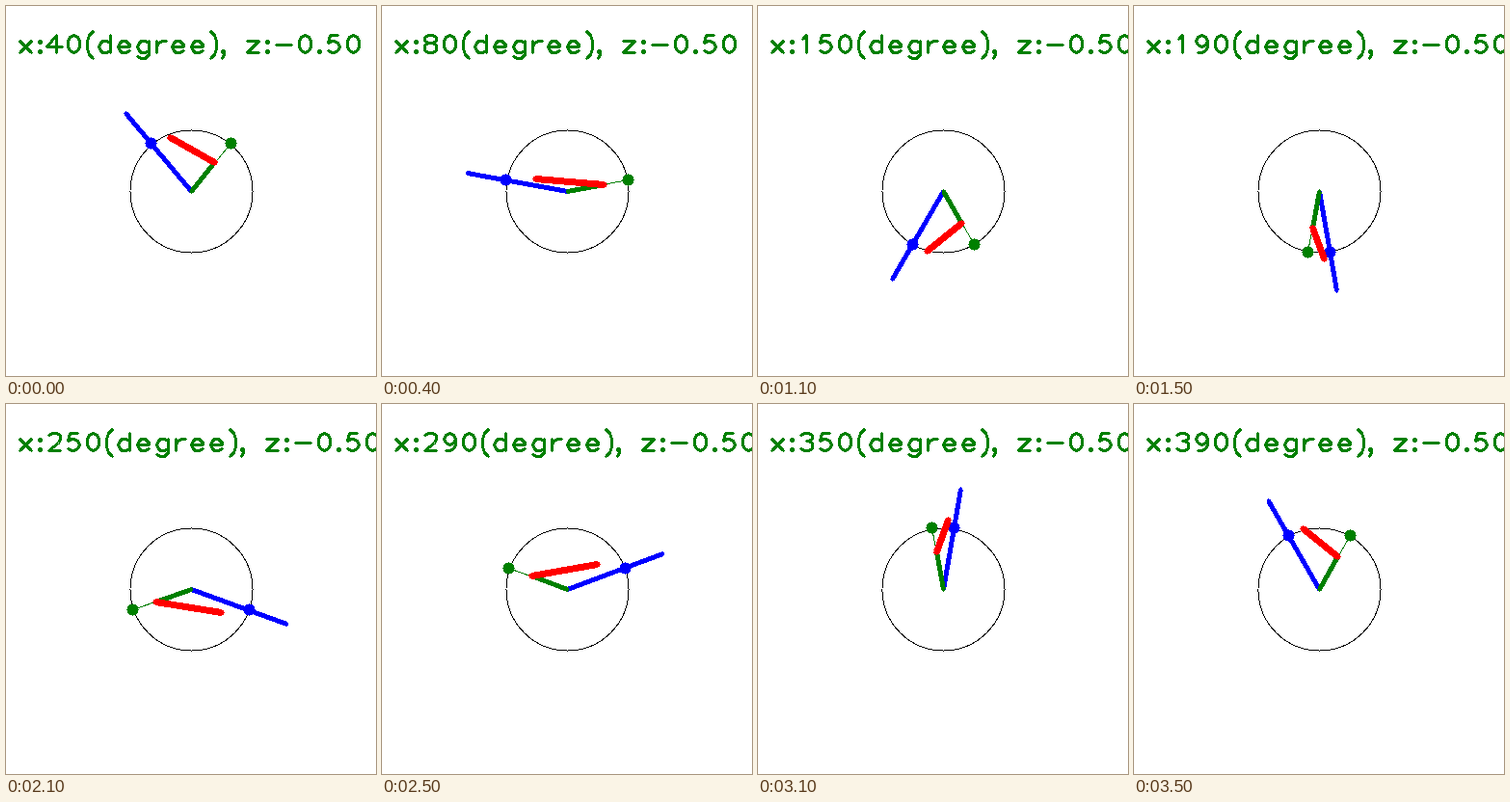
Animation, 384 px wide and 384 px high, one loop 3.6 s. Source, as an HTML page:

```html
<!DOCTYPE html>
<html lang="en">
<meta charset="utf-8">
<title>Complex cosine</title>
<style>
  html, body { margin: 0; width: 100%; height: 100%; overflow: hidden; background: #fff; }
  svg { display: block; fill: none; shape-rendering: crispEdges; }
  /* Each thick line is a flat-ended body over slightly slimmer round caps. */
  .caps { stroke-linecap: round; stroke-linejoin: round; }
  .body { stroke-linecap: butt; stroke-linejoin: bevel; }
</style>
<svg width="384" height="384" viewBox="0 0 384 384" role="img">
  <defs>
    <path id="blueArm"/>
    <path id="greenArm"/>
    <path id="redArm"/>
    <g id="label"></g>
  </defs>
  <g transform="translate(.5 .5)">
    <circle cx="192" cy="192" r="63.52" stroke="#000"/>
    <path id="spoke" stroke="#008000"/>
    <g stroke="#00f">
      <use href="#blueArm" class="caps" stroke-width="4.1"/>
      <use href="#blueArm" class="body" stroke-width="5"/>
    </g>
    <circle id="blueDot" r="6.05" fill="#00f"/>
    <g stroke="#008000">
      <use href="#greenArm" class="caps" stroke-width="4.1"/>
      <use href="#greenArm" class="body" stroke-width="5"/>
    </g>
    <circle id="greenDot" r="6.05" fill="#008000"/>
    <g stroke="#f00">
      <use href="#redArm" class="caps" stroke-width="6.1"/>
      <use href="#redArm" class="body" stroke-width="7"/>
    </g>
    <g stroke="#008000" transform="translate(10 40) scale(2)">
      <use href="#label" class="caps" stroke-width="1.1"/>
      <use href="#label" class="body" stroke-width="1.5"/>
    </g>
  </g>
</svg>
<script>
// Stroke font: advance width, then the pen path around the middle line.
const glyphs = {
  '0': [10, 'M5-5L3-4 2-2V1L3 3 5 4 7 3 8 1V-2L7-4z'],
  '1': [10, 'M3-3L5-5V4'],
  '2': [10, 'M2-4L4-5H6L8-4V-2L7 0 2 4H8'],
  '3': [10, 'M2-4L4-5H6L8-4V-2L6-1M5-1H6L8 0V3L6 4H4L2 3'],
  '4': [10, 'M6-5V4M6-5L1 1H9'],
  '5': [10, 'M7-5H3L2-1 4-2H5L7-1 8 1 7 3 5 4H4L2 3'],
  '6': [10, 'M7-4L5-5 3-4 2-2V1L3 3 5 4 7 3 8 1 7-1 5-2 3-1 2 1'],
  '7': [10, 'M2-5H8L4 4'],
  '8': [10, 'M4-5L2-4V-2L4-1H6L8-2V-4L6-5zM4-1L2 0V3L4 4H6L8 3V0L6-1'],
  '9': [10, 'M8-2L7 0 5 1 3 0 2-2 3-4 5-5 7-4 8-2V1L7 3 5 4 3 4'],
  'x': [10, 'M2-2L8 4M8-2L2 4'],
  'z': [10, 'M2-2H8L2 4H8'],
  'd': [10, 'M8-5V4M8-1L6-2H4L3-1 2 1 3 3 4 4H6L8 3'],
  'e': [10, 'M2 1H8V0L7-1 6-2H4L3-1 2 1 3 3 4 4H6L8 3'],
  'g': [10, 'M8-2V5L6 7H4L2 6M8-1L6-2H4L3-1 2 1 3 3 4 4H6L8 3'],
  'r': [8, 'M2-2V4M2 1L3-1 5-2H7'],
  '(': [6, 'M5-7L3-5 2-2V2L3 5 5 7'],
  ')': [6, 'M2-7L4-5 5-2V2L4 5 2 7'],
  ':': [5, 'M2-2H3V-1H2zM2 3H3V4H2z'],
  ',': [5, 'M3 4H2V3H3V5L2 7'],
  '.': [5, 'M2 3H3V4H2z'],
  '-': [12, 'M2 0H10'],
  ' ': [8, '']
};

const $ = id => document.getElementById(id);
const center = 192, radius = 64, z = -0.5;
const origin = [center, center];
const whole = v => Math.floor(v + 1e-9);

// Whole-pixel point at a clockwise angle from the top.
const polar = (angle, r) =>
  [center + r * Math.sin(angle), center - r * Math.cos(angle)].map(whole);

function line(id, from, to) {
  $(id).setAttribute('d', `M${from}L${to}`);
}

function dot(id, [x, y]) {
  $(id).setAttribute('cx', x);
  $(id).setAttribute('cy', y);
}

function write(text) {
  let x = 0, out = '';
  for (const c of text) {
    const [width, path] = glyphs[c];
    out += `<path transform="translate(${x} 0)" d="${path}"/>`;
    x += width;
  }
  $('label').innerHTML = out;
  document.querySelector('svg').setAttribute('aria-label', text);
}

function draw(degrees) {
  const a = degrees * Math.PI / 180;
  const blue = polar(-a, radius * Math.exp(-z));
  const green = polar(a, radius * Math.exp(z));
  const middle = blue.map((v, i) => whole((v + green[i]) / 2));
  line('spoke', origin, polar(a, radius));
  line('blueArm', origin, blue);
  dot('blueDot', polar(-a, radius));
  line('greenArm', origin, green);
  dot('greenDot', polar(a, radius));
  line('redArm', green, middle);
  write(`x:${degrees}(degree), z:${z.toFixed(2)}`);
}

const start = performance.now();
let shown;
function tick() {
  const elapsed = performance.now() - start;
  const degrees = 40 + 10 * Math.floor(elapsed % 3600 / 100);
  if (degrees !== shown) draw(shown = degrees);
  requestAnimationFrame(tick);
}
tick();
</script>
</html>
```
